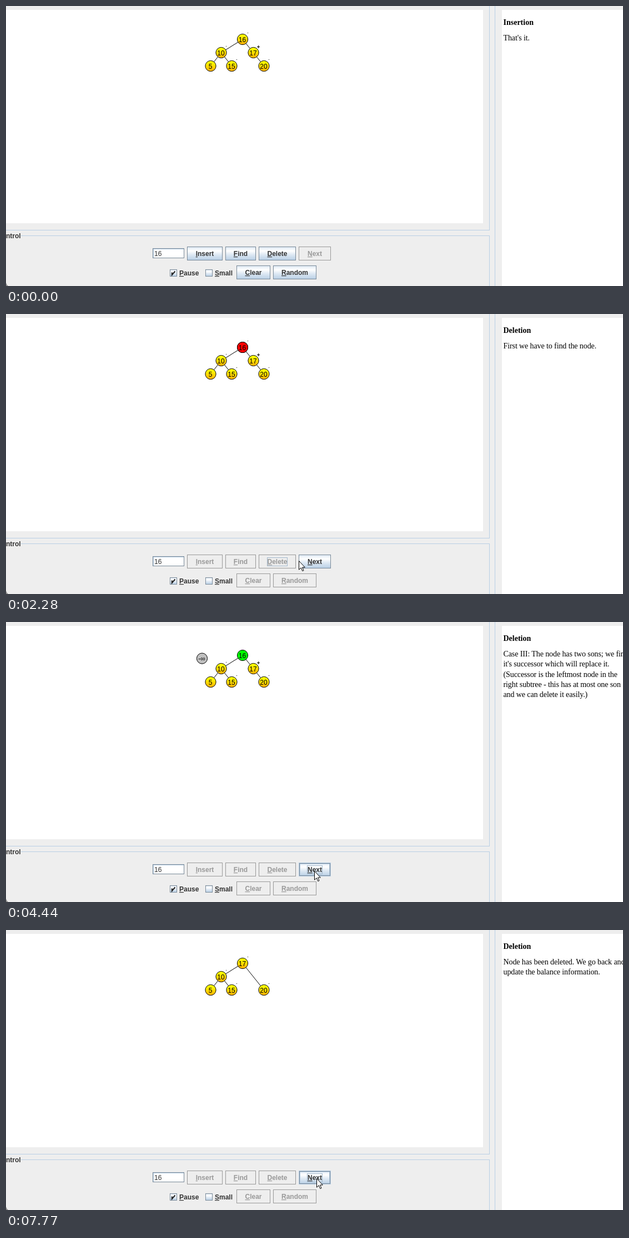
These frames come from a looping animation (1111 px wide and 504 px high, 8000 ms). An HTML page:

```html
<!DOCTYPE html>
<html lang="en">
<head>
<meta charset="utf-8">
<title>AVL tree deletion</title>
<style>
  html, body { margin: 0; width: 100%; height: 100%; overflow: hidden; background: #eee; }
  svg { display: block; width: 100%; height: 100%; }
  text { font: 12px "Liberation Sans", Arial, sans-serif; fill: #333; white-space: pre; }
  .b { font-weight: bold; }
  .u { text-decoration: underline; }
  .node { fill: #000; text-anchor: middle; }
  .note { font: 14px "Liberation Serif", "Times New Roman", serif; fill: #000; letter-spacing: -0.1px; }
  .head { font-weight: bold; letter-spacing: 0; }
  rect, .rule { shape-rendering: crispEdges; }
</style>
</head>
<body>
<svg viewBox="0 0 1111 504" preserveAspectRatio="none">
  <defs>
    <linearGradient id="steel" x2="0" y2="1">
      <stop stop-color="#dde8f3"/><stop offset=".3" stop-color="#fff"/>
      <stop offset=".6" stop-color="#dde8f3"/><stop offset="1" stop-color="#b8cfe5"/>
    </linearGradient>
    <linearGradient id="gold" x2="0" y2="1">
      <stop offset=".15" stop-color="#ff0"/><stop offset="1" stop-color="#ffb000"/>
    </linearGradient>
    <clipPath id="canvas"><rect y="7" width="859" height="384"/></clipPath>
  </defs>
  <rect width="1111" height="504" fill="#eee"/>
  <rect y="7" width="859" height="384" fill="#fff"/>
  <rect x="893" y="7" width="218" height="497" fill="#fff"/>
  <path class="rule" fill="none" stroke="#b8cfe5"
    d="M0 403.5H870.5V0M880.5 0V504M27 413.5H870.5V504"/>
  <path d="M0 498Q1 502 4 504H0Z" fill="#888"/>
  <text class="b" x="0" y="418">ntrol</text>
  <rect x="264.5" y="436.5" width="56" height="17" fill="#fff" stroke="#7a8a99"/>
  <path class="rule" d="M265 437.5H320M265.5 437V453" stroke="#b8cfe5"/>
  <text x="267" y="450">16</text>
  <g id="checks"></g>
  <g id="tree" clip-path="url(#canvas)"></g>
  <g id="notes"></g>
  <g id="buttons"></g>
  <path id="cursor" d="M.5 .5V16.2L4.2 12.8 6.8 18.6 9 17.6 6.5 12H11.3Z" fill="#fff" stroke="#000"/>
</svg>
<script>
const LOOP = 8000, TICK = 30;
const $ = id => document.getElementById(id);

const buttons = [
  ["Insert", 326, 433, 64], ["Find", 395, 433, 55], ["Delete", 455, 433, 67],
  ["Next", 527, 433, 58], ["Clear", 415, 467, 61], ["Random", 481, 467, 78]
];

// Pointer path: time, x, y
const pointer = [
  [270, 1097, 53], [300, 1011, 113], [330, 941, 178], [360, 885, 222], [390, 826, 265],
  [420, 771, 293], [450, 706, 332], [480, 664, 351], [510, 637, 363], [540, 613, 374],
  [600, 598, 382], [810, 535, 416], [1020, 489, 440], [2070, 489, 440], [2190, 514, 442],
  [2280, 527, 444], [2400, 530, 445], [2850, 530, 445], [3600, 555, 448], [5010, 555, 448],
  [5160, 558, 447], [5280, 558, 447], [5310, 559, 447]
];

// Presses: button, down, up
const presses = [["Delete", 1680, 1770], ["Next", 3960, 4020], ["Next", 5760, 5850], ["Next", 7230, 7320]];

const notes = [
  [0, "Insertion", "That's it."],
  [1770, "Deletion", "First we have to find the node."],
  [4020, "Deletion", "Case III: The node has two sons; we find", "it's successor which will replace it.",
    "(Successor is the leftmost node in the", "right subtree - this has at most one son", "and we can delete it easily.)"],
  [7320, "Deletion", "Node has been deleted. We go back and", "update the balance information."]
];

const ROOT = [426, 60], LEFT = [387.5, 84], RIGHT = [445.5, 84];
const N5 = [368.5, 108], N15 = [406.5, 108], N20 = [464.5, 108];
const SIDE = [454.5, 60], OFFSTAGE = [-17, -8], BELOW = [426, 420];

const mix = (a, b, k) => a.map((v, i) => v + (b[i] - v) * k);
// Moves take ten discrete steps
const progress = (t, start, gap = 50) =>
  Math.max(0, Math.min(10, Math.floor((t - start) / gap) + 1)) / 10;

const label = (s, x, y, fill = "#333", anchor = "start") =>
  `<text class="b" x="${x}" y="${y}" fill="${fill}" style="fill:${fill}" text-anchor="${anchor}">` +
  `<tspan class="u">${s[0]}</tspan>${s.slice(1)}</text>`;
const box = (x, y, w, h, stroke, fill = "none") =>
  `<rect x="${x + .5}" y="${y + .5}" width="${w - 1}" height="${h - 1}" stroke="${stroke}" fill="${fill}"/>`;

const edge = (a, b) => `<path d="M${a}L${b}" stroke="#000"/>`;
const node = ([x, y], s, fill = "url(#gold)") =>
  `<circle cx="${x}" cy="${y}" r="9.6" fill="${fill}" stroke="#000"/>` +
  `<text class="node" x="${x - .5}" y="${y + 4.5}">${s}</text>`;
const dot = ([x, y]) => `<rect x="${Math.round(x + 8.5)}" y="${Math.round(y - 12)}" width="1" height="1"/>`;
const plus = ([x, y]) => `<path d="M${x + 6.5} ${y - 10.5}h5m-2.5 -2.5v5" stroke="#000"/>`;

function pointerAt(t) {
  if (t < pointer[0][0]) return null;
  const i = pointer.findIndex(p => p[0] > t);
  if (i < 0) return pointer[pointer.length - 1].slice(1);
  const a = pointer[i - 1], b = pointer[i];
  return mix(a, b, (t - a[0]) / (b[0] - a[0])).slice(1).map(Math.round);
}

function drawTree(t) {
  const detached = t >= 5850, replaced = t >= 7320, marked = t >= 4020;
  const spare = replaced ? mix(SIDE, ROOT, progress(t, 7320)) : mix(RIGHT, SIDE, progress(t, 5850, 53));
  const top = replaced ? spare : ROOT;
  let s = edge(top, LEFT) + edge(LEFT, N5) + edge(LEFT, N15);
  s += detached ? edge(top, N20) : edge(top, RIGHT) + edge(RIGHT, N20);
  s += node(LEFT, 10) + node(N5, 5) + node(N15, 15) + node(N20, 20);
  s += [LEFT, N5, N15, N20].map(dot).join("");
  if (!marked) s += node(ROOT, 16) + dot(ROOT);
  else if (!replaced) s += node(ROOT, 16, "#0f0");
  else if (t < 7770) s += node(mix(ROOT, BELOW, progress(t, 7320)), 16, "#0f0");
  s += node(spare, 17) + (detached ? dot : plus)(spare);
  if (t >= 1770 && !marked) s += node(mix(OFFSTAGE, ROOT, progress(t, 1800)), 16, "#f00");
  if (marked && !detached) s += node(mix(OFFSTAGE, RIGHT, progress(t, 4050)), "-∞", "#c0c0c0");
  return s;
}

function drawButton([name, x, y, w], t, tip) {
  const h = 25, dark = "#7a8a99", pale = "#b8cfe5";
  const enabled = (name === "Next") === (t >= 1770);
  const pressed = presses.some(([n, down, up]) => n === name && t >= down && t < up);
  const hover = tip && tip[0] > x + .5 && tip[0] < x + w && tip[1] >= y && tip[1] < y + h;
  const focus = name === (t >= 3960 ? "Next" : t >= 1680 ? "Delete" : "");
  let s;
  if (!enabled) s = box(x, y, w, h, "#999", "#eee");
  else if (pressed) s = box(x, y, w, h, dark, pale) +
    `<path class="rule" d="M${x} ${y + 1.5}h${w}M${x + 1.5} ${y}v${h}" stroke="${dark}"/>`;
  else if (hover) s = box(x, y, w, h, pale, "url(#steel)") + box(x + 2, y + 2, w - 4, h - 4, pale) +
    box(x + 1, y + 1, w - 2, h - 2, dark);
  else s = box(x, y, w, h, dark, "url(#steel)");
  if (focus) s += box(x + 15, y + 5, w - 30, 16, "#a3b8cc");
  return s + label(name, x + w / 2, y + 17, enabled ? "#333" : "#999", "middle");
}

function drawNotes(t) {
  const [, head, ...lines] = notes.filter(n => n[0] <= t).pop();
  return `<text class="note head" x="895.5" y="34">${head}</text>` + lines.map((line, i) =>
    `<text class="note" x="895.5" y="${Math.round(62 + i * 18.3)}">${line}</text>`).join("");
}

function render(time) {
  const t = Math.floor(time % LOOP / TICK) * TICK;
  const tip = pointerAt(t);
  $("tree").innerHTML = drawTree(t);
  $("notes").innerHTML = drawNotes(t);
  $("buttons").innerHTML = buttons.map(b => drawButton(b, t, tip)).join("");
  $("cursor").style.display = tip ? "" : "none";
  if (tip) $("cursor").setAttribute("transform", `translate(${tip})`);
}

$("checks").innerHTML = [["Pause", 295], ["Small", 359]].map(([name, x]) =>
  box(x, 474, 13, 13, "#7a8a99", "url(#steel)") + label(name, x + 17, 485)).join("") +
  `<path d="M298.8 479.5V484L304.5 477.5" fill="none" stroke="#222" stroke-width="2"/>`;

const start = performance.now();
function frame() {
  render(performance.now() - start);
  requestAnimationFrame(frame);
}
frame();
</script>
</body>
</html>
```
